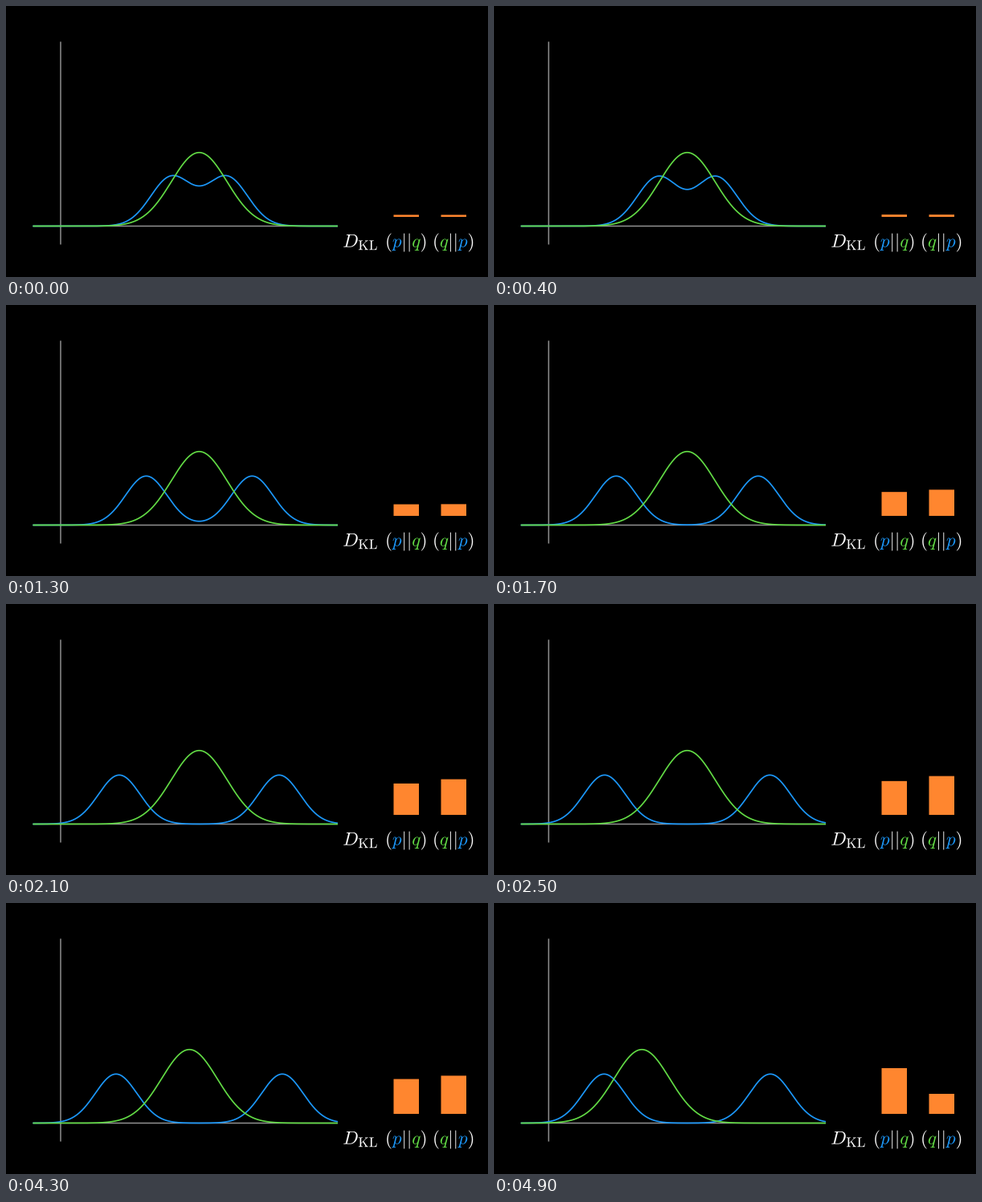
Recreate the animation shown at these times as a matplotlib script. Size 600 by 338 pixels, loop 5 s.

```python
import numpy as np
import matplotlib.pyplot as plt
from matplotlib.animation import FuncAnimation
from matplotlib.patches import PathPatch, Rectangle
from matplotlib.textpath import TextPath
from matplotlib.transforms import Affine2D

plt.rcParams["mathtext.fontset"] = "cm"

W, H, DPI = 600, 338, 100
FRAMES, STEP = 50, 100
BLUE, GREEN, ORANGE, GREY = "#1c98fa", "#62db45", "#ff862f", "#999999"

X0, Y0, UX, UY = 68, 274.5, 34.5, 230      # origin and pixels per unit
MOVE, START_P, START_Q = 2800, -50, 3450   # timing in ms
BAR_X, BAR_W, BAR_BASE = (482.5, 541.5), 31.5, 263
EM, BASELINE = 23, 300.8
ADVANCE = {"(": 0.389, ")": 0.389, "p": 0.503, "q": 0.446, r"\vert": 0.278}


def px(points):
    return points * 72 / DPI


def sigmoid(x):
    return 1 / (1 + np.exp(-x))


def smooth(t):
    t = np.clip(t, 0, 1)
    edge = sigmoid(-5)
    return (sigmoid(10 * (t - 0.5)) - edge) / (1 - 2 * edge)


def normal(x, mean, sd):
    return np.exp(-0.5 * ((x - mean) / sd) ** 2) / (sd * np.sqrt(2 * np.pi))


def mixture(x, offset):
    return 0.5 * (normal(x, 5 - offset, 0.75) + normal(x, 5 + offset, 0.75))


def divergence(a, b):
    return np.sum(a * np.log(a / b)) * (wide[1] - wide[0])


fig = plt.figure(figsize=(W / DPI, H / DPI), dpi=DPI, facecolor="black")
ax = fig.add_axes([0, 0, 1, 1])
ax.set_xlim(0, W)
ax.set_ylim(H, 0)
ax.axis("off")

xs = np.linspace(-1, 10, 500)
wide = np.linspace(-3, 13, 1601)


def line(x, y, color, width):
    return ax.plot(x, y, color=color, lw=px(width), snap=False,
                   solid_capstyle="butt", solid_joinstyle="round")[0]


def glyph(tex, x, y, size, color="white"):
    place = Affine2D().scale(1, -1).translate(x, y)
    ax.add_patch(PathPatch(TextPath((0, 0), f"${tex}$", size=size),
                           fc=color, lw=0, transform=place + ax.transData))


def pair(first, second, center):
    parts = ["(", first, r"\vert", r"\vert", second, ")"]
    x = center - EM * sum(ADVANCE[s] for s in parts) / 2
    for s in parts:
        glyph(s, x, BASELINE, EM, {"p": BLUE, "q": GREEN}.get(s, "white"))
        x += EM * ADVANCE[s]


line([X0 - UX, X0 + 10 * UX], [Y0, Y0], GREY, 1.4)
line([X0, X0], [Y0 - UY, Y0 + 0.1 * UY], GREY, 1.4)
p_line = line(X0 + UX * xs, 0 * xs, BLUE, 1.7)
q_line = line(X0 + UX * xs, 0 * xs, GREEN, 1.7)

bars = [ax.add_patch(Rectangle((x, BAR_BASE), BAR_W, 0, fc=ORANGE, lw=0, snap=False))
        for x in BAR_X]

glyph("D", 419.3, BASELINE, EM)
glyph(r"\mathrm{KL}", 438.3, BASELINE + 3.5, 17.2)
pair("p", "q", BAR_X[0] + BAR_W / 2)
pair("q", "p", BAR_X[1] + BAR_W / 2)


def update(i):
    now = i * STEP
    offset = 1 + 2 * smooth((now - START_P) / MOVE)
    mean = 5 - 3 * smooth((now - START_Q) / MOVE)

    p_line.set_ydata(Y0 - UY * mixture(xs, offset))
    q_line.set_ydata(Y0 - UY * normal(xs, mean, 1))

    p, q = mixture(wide, offset), normal(wide, mean, 1)
    for bar, kl in zip(bars, (divergence(p, q), divergence(q, p))):
        bar.set_height(-(1.5 + 10.65 * kl))
    return [p_line, q_line, *bars]


anim = FuncAnimation(fig, update, frames=FRAMES, interval=STEP, repeat=True,
                     repeat_delay=0, blit=False)
plt.show()
```
